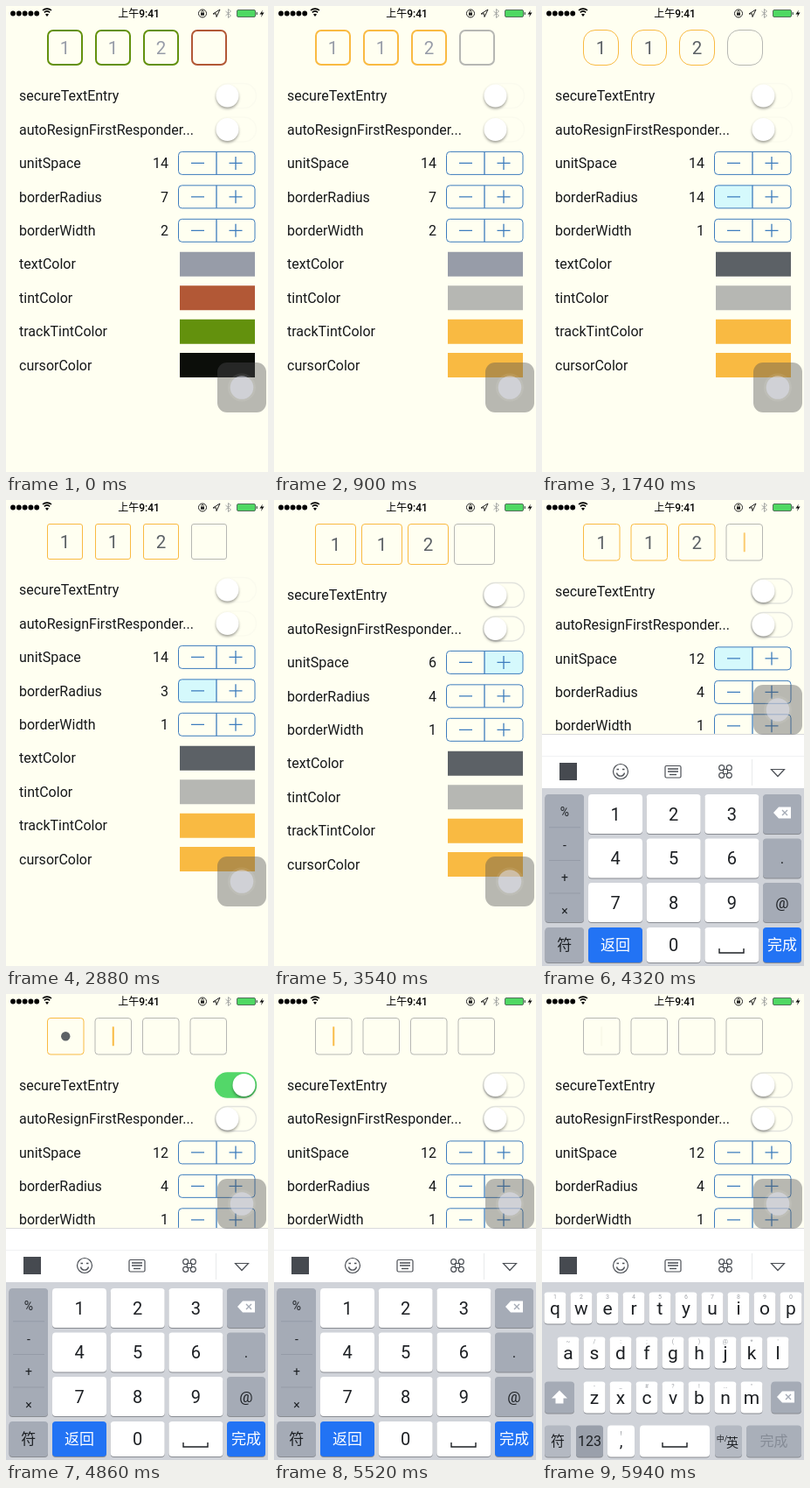
An HTML page with a canvas for the animation above (6000 ms loop, 300 px wide and 532 px high).

```html
<!DOCTYPE html>
<html lang="en">
<head>
<meta charset="utf-8">
<title>Unit field settings</title>
<style>
html, body { margin: 0; width: 100%; height: 100%; overflow: hidden; background: #fffff1; }
canvas { display: block; width: 300px; height: 532px; }
</style>
</head>
<body>
<canvas id="stage" width="300" height="532"></canvas>
<script>
const g = document.getElementById('stage').getContext('2d');
const LOOP = 6000, STEP = 60, BG = '#fffff1', INK = '#16181a', BLUE = '#3d7cbe';
const KEY_DARK = '#a5abb6', KEY_TEXT = '#1d2024', ICON = '#4b4f55';

// Settings over the session; the session is played backwards.
const SPACE = [[1680, 12], [2040, 2], [2160, 0], [2220, 0], [2460, 6], [2760, 14]];
const RADIUS = [[3000, 4], [3120, 3], [3300, 0], [3360, 0], [3900, 20], [3960, 20], [4260, 14], [4680, 7]];
const WIDTH = [[4740, 1], [4920, 2]];
const COLORS = [
  ['textColor', '#5c6166', '#979ca8', 5100],
  ['tintColor', '#b6b7b3', '#b25836', 5340],
  ['trackTintColor', '#f9ba42', '#63910d', 5580],
  ['cursorColor', '#f9ba42', '#0c0e0a', 5820]
];

const clamp = v => Math.max(0, Math.min(1, v));
const ramp = (s, a, b) => clamp((s - a) / (b - a));
const smooth = p => p * p * (3 - 2 * p);

function at(keys, s) {
  let [t0, v0] = keys[0];
  for (const [t1, v1] of keys) {
    if (s < t1) return v0 + (v1 - v0) * ramp(s, t0, t1);
    [t0, v0] = [t1, v1];
  }
  return v0;
}

function rect(x, y, w, h, r, fill, stroke, line = 1) {
  g.beginPath();
  g.roundRect(x, y, w, h, r);
  if (fill) { g.fillStyle = fill; g.fill(); }
  if (stroke) { g.strokeStyle = stroke; g.lineWidth = line; g.stroke(); }
}

function disc(x, y, r, fill, stroke, line = 1) {
  rect(x - r, y - r, 2 * r, 2 * r, r, fill, stroke, line);
}

function path(d, fill, stroke, line = 1, x = 0, y = 0) {
  g.save();
  g.translate(x, y);
  const p = new Path2D(d);
  if (fill) { g.fillStyle = fill; g.fill(p); }
  if (stroke) { g.strokeStyle = stroke; g.lineWidth = line; g.stroke(p); }
  g.restore();
}

// y is the middle of the capitals
function text(str, x, y, size = 16, color = INK, align = 'center', weight = 400) {
  g.font = `${weight} ${size}px Roboto, "Noto Sans CJK SC", "Noto Sans CJK", sans-serif`;
  g.textAlign = align;
  g.fillStyle = color;
  g.fillText(str, x, y + size * 0.355);
}

function statusBar() {
  for (let i = 0; i < 5; i++) disc(8 + i * 6.8, 8.5, 2.9, '#000');
  path('M-5 -2 A7.5 7.5 0 0 1 5 -2 M-3.2 .3 A4.8 4.8 0 0 1 3.2 .3', null, '#000', 1.6, 47, 7);
  path('M0 5 L-2 2.6 A3 3 0 0 1 2 2.6Z', '#000', null, 1, 47, 7);
  text('上午9:41', 152, 8.5, 12, '#000', 'center', 500);
  disc(225, 8.5, 4.5, null, '#222', 1);
  rect(223, 7.5, 4, 3.2, 0.5, '#222');
  path('M-1.2 0 V-1 A1.2 1.2 0 0 1 1.2 -1 V0', null, '#222', 0.8, 225, 7.6);
  path('M-4 1 L4 -4 L0 4.5 L-.4 .8Z', null, '#222', 1, 241, 8);
  path('M-3 -2.5 L3 2.5 L0 5 V-5 L3 -2.5 L-3 2.5', null, '#a5a7a5', 1, 254.5, 8.5);
  rect(264.5, 4.5, 21, 8, 1.5, '#4fd863', '#52705a', 1);
  rect(286.5, 7, 1.5, 3, 0.5, '#52705a');
  path('M1 -4 L-2.5 1 H0 L-1 4.5 L2.5 -1 H0Z', '#111', null, 1, 293, 8.5);
}

function units(s, size, gap, colors) {
  const [ink, tint, track, cursor] = colors;
  const typed = [700, 1300, 1440].filter(t => s >= t).length;
  const line = Math.round(at(WIDTH, s)), radius = Math.round(at(RADIUS, s));
  const secure = s >= 960 && s < 1590;
  for (let i = 0; i < 4; i++) {
    const x = 47 + i * (size + gap), mid = x + size / 2, cy = 27 + size / 2;
    rect(x + line / 2, 27 + line / 2, size - line, size - line,
      Math.max(0, Math.min(radius, size / 2) - line / 2), null, i < typed ? track : tint, line);
    if (i < typed) {
      if (secure) disc(mid, cy, 5.2, ink);
      else text('112'[i], mid, cy + 0.5, 20.5, ink);
    } else if (i === typed && s < 2160) {
      g.globalAlpha = clamp(0.6 + 0.7 * Math.cos((s - 1140) / 305 * 2 * Math.PI)) * 0.85 + 0.15;
      rect(mid - 1, cy - 11, 2, 22, 0.5, s < 120 ? '#d9d5c5' : cursor);
      g.globalAlpha = 1;
    }
  }
}

function toggle(y, on, outlined) {
  const edge = on > 0.5 ? '#53d769' : outlined ? '#e2e3dd' : '#fbfbee';
  rect(239.5, y - 14, 47, 28, 14, on > 0.5 ? '#53d769' : BG, edge, 1.4);
  g.save();
  g.shadowColor = 'rgba(0,0,0,.35)';
  g.shadowBlur = 3;
  g.shadowOffsetY = 2;
  disc(253.5 + 19 * on, y, 13, '#fff');
  g.restore();
}

function stepper(y, keys, s) {
  const slope = at(keys, s + 1) - at(keys, s);
  text(Math.round(at(keys, s)), 186, y, 16, INK, 'right');
  if (slope < 0) rect(197.5, y - 13, 43.5, 26, [4, 0, 0, 4], '#d5f9fc');
  if (slope > 0) rect(241, y - 13, 44, 26, [0, 4, 4, 0], '#d5f9fc');
  rect(197.5, y - 13, 87.5, 26, 4, null, BLUE);
  path('M241 -13 V13 M212 0 H227 M255.5 0 H270.5 M263 -7.5 V7.5', null, BLUE, 1.3, 0, y);
}

function settings(s, dy, colors) {
  const names = ['secureTextEntry', 'autoResignFirstResponder...', 'unitSpace', 'borderRadius', 'borderWidth',
    ...COLORS.map(c => c[0])];
  const secure = smooth(ramp(s, 900, 1020)) - smooth(ramp(s, 1530, 1650));
  names.forEach((name, i) => {
    const y = 102.5 + dy + i * 38.45;
    text(name, 15, y, 16, INK, 'left');
    if (i < 2) toggle(y, i ? 0 : secure, s < 2800);
    else if (i < 5) stepper(y, [SPACE, RADIUS, WIDTH][i - 2], s);
    else rect(199, y - 14, 86, 28, 0, colors[i - 5]);
  });
}

function key(x, y, w, h, label, fill = '#fff', size = 20, color = KEY_TEXT) {
  rect(x, y + 1, w, h, 4, '#898c92');
  rect(x, y, w, h, 4, fill);
  if (label) text(label, x + w / 2, y + h / 2, size, color);
}

function backspace(x, y) {
  path('M-10 0 L-4 -6.5 H10 V6.5 H-4Z', '#fff', null, 1, x, y);
  path('M0 -3 L6 3 M6 -3 L0 3', null, KEY_DARK, 1.4, x, y);
}

function spaceMark(x, y) {
  path('M-14 -3 V2 H14 V-3', null, KEY_TEXT, 1.4, x, y);
}

function toolbar() {
  rect(0, 267, 300, 62, 0, '#fff');
  rect(0, 267, 300, 1, 0, '#d9dadb');
  rect(0, 292, 300, 1, 0, '#f1f2f3');
  rect(20, 300, 20, 20, 0, '#464a50');
  disc(90, 310, 8.5, null, ICON, 1.2);
  path('M-4.5 1.5 A4.6 4.6 0 0 0 4.5 1.5 M-4.5 -2.5 H-2 M2 -2.5 H4.5', null, ICON, 1.3, 90, 310);
  rect(141, 303.5, 18, 13.5, 1.5, null, ICON, 1.2);
  path('M-6 -3 H6 M-6 0 H6', null, ICON, 1.4, 150, 310);
  path('M-4 3.5 H4', null, ICON, 1.4, 150, 310);
  for (const [x, y] of [[-1, -1], [1, -1], [-1, 1], [1, 1]]) disc(210 + x * 4.3, 310 + y * 4.3, 3, null, ICON, 1.2);
  rect(207.5, 307.5, 5, 5, 0, null, ICON, 1.1);
  rect(240, 296, 1, 30, 0, '#e9eaeb');
  path('M-7.5 -3.5 H7.5 L0 4.5Z', null, ICON, 1.2, 270, 311);
}

function numberPad() {
  rect(3.5, 337, 44.5, 146, 4, '#898c92');
  rect(3.5, 336, 44.5, 146, 4, KEY_DARK);
  ['%', '-', '+', '×'].forEach((c, i) => {
    text(c, 26, 356 + i * 37.7, 14, KEY_TEXT);
    if (i) rect(8, 335.5 + i * 37.7, 36, 1, 0, '#959ba7');
  });
  for (let i = 0; i < 9; i++) key(53 + i % 3 * 66.7, 336 + Math.floor(i / 3) * 50.5, 62, 45, i + 1);
  ['', '.', '@'].forEach((c, i) => key(253, 336 + i * 50.5, 44, 45, c, KEY_DARK, 17));
  backspace(275, 357);
  key(3.5, 488, 44.5, 40, '符', KEY_DARK, 17);
  key(53, 488, 62, 40, '返回', '#2273f4', 17, '#fff');
  key(119.7, 488, 62, 40, '0');
  key(186.4, 488, 62, 40);
  spaceMark(217, 515);
  key(253, 488, 44, 40, '完成', '#2273f4', 17, '#fff');
}

function letterPad() {
  const rows = [['qwertyuiop', '1234567890', 15], ['asdfghjkl', '~/:;()@*\'', 30], ['zxcvbnm', '-_#?!…"', 60]];
  rows.forEach(([letters, hints, x0], r) => [...letters].forEach((c, i) => {
    const x = x0 + i * 30, y = 340.5 + r * 51;
    key(x - 12.5, y, 25, 36);
    text(hints[i], x, y + 5.5, 7, '#a2a5aa');
    text(c, x, y + 18, 21, KEY_TEXT);
  }));
  key(3, 442.5, 34, 36, '', KEY_DARK);
  path('M0 -8 L9 1 H4.5 V7 H-4.5 V1 H-9Z', '#fff', null, 1, 20, 460.5);
  key(262.5, 442.5, 34.5, 36, '', KEY_DARK);
  backspace(279, 460);
  key(3, 492.5, 30, 36, '符', '#b4b9c2', 16);
  key(39, 492.5, 31, 36, '123', '#9aa0ab', 16);
  key(75, 492.5, 31, 36);
  text('!', 90.5, 502, 7, '#777a80');
  text(',', 90.5, 510, 19, KEY_TEXT);
  key(112, 492.5, 80, 36);
  spaceMark(152, 515);
  key(198, 492.5, 31, 36, '', '#b4b9c2');
  text('中/', 206, 508, 9, KEY_TEXT);
  text('英', 218, 512, 14, KEY_TEXT);
  key(234, 492.5, 63, 36, '完成', '#a9afb9', 16, '#858b96');
}

function draw(now) {
  const s = LOOP - Math.floor(now % LOOP / STEP) * STEP;
  const gap = Math.round(at(SPACE, s)), size = (206 - 3 * gap) / 4;
  const colors = COLORS.map(([, before, after, t]) => s < t ? before : after);
  const hide = smooth(ramp(s, 2100, 2340));

  rect(0, 0, 300, 532, 0, BG);
  statusBar();
  units(s, size, gap, colors);
  settings(s, size - 41, colors);

  if (hide < 1) {
    g.save();
    g.translate(0, 265 * hide);
    toolbar();
    rect(0, 329, 300, 203, 0, '#d0d3d9');
    (s < 360 ? letterPad : numberPad)();
    g.restore();
  }

  const y = 239.5 + 196 * hide;
  rect(242, y - 28.5, 56, 57, 11, 'rgba(78,78,82,.4)');
  disc(270, y, 16, 'rgba(255,255,255,.08)');
  disc(270, y, 13.3, 'rgba(225,228,245,.5)');
  requestAnimationFrame(() => draw(performance.now() - start));
}

const start = performance.now();
draw(0);
</script>
</body>
</html>
```
